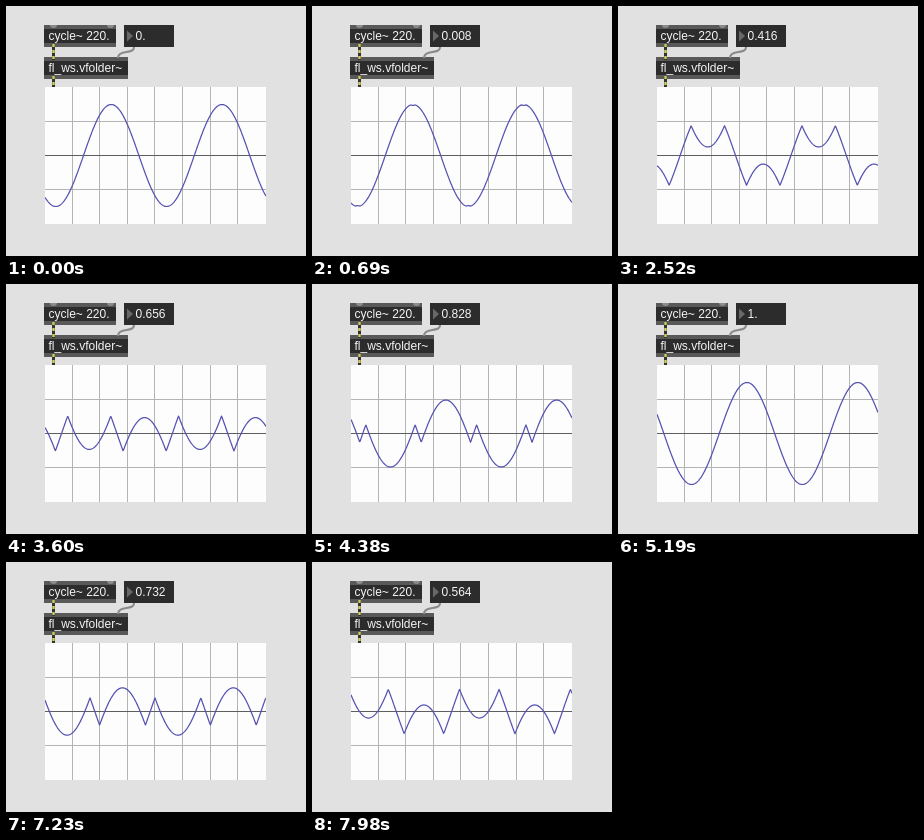
Animation of 300 by 250 pixels, one loop 8 s. Source, as an HTML page:

```html
<!DOCTYPE html>
<html lang="en">
<head>
<meta charset="utf-8">
<title>Wavefolder</title>
<style>
  html, body { margin: 0; width: 100%; height: 100%; overflow: hidden; background: #e1e1e1; }
  svg { display: block; width: 300px; height: 250px; }
  text { font: 12px "Liberation Sans", Arial, sans-serif; fill: #f4f4f4; }
  .body { fill: #2c2c2c; }
  .edge { fill: #595959; }
  .port { fill: #8c8c8c; }
  .grid { stroke: #b4b4b4; fill: none; }
  .axis { stroke: #5e5e62; }
  .cord { stroke: #34342c; stroke-width: 3; }
  .stripe { stroke: #cfd060; stroke-width: 2.4; stroke-dasharray: 3 3; }
</style>
</head>
<body>
<svg viewBox="0 0 300 250">
  <clipPath id="screen"><rect x="39" y="81" width="221" height="137"/></clipPath>

  <rect x="39" y="81" width="221" height="137" fill="#fdfdfd"/>
  <path id="grid" class="grid"/>
  <path class="axis" d="M39 149.5H260"/>
  <path id="wave" clip-path="url(#screen)" fill="none" stroke="#5552b0" stroke-width="1.25" stroke-linejoin="round"/>

  <rect class="body" x="38" y="19" width="72" height="22"/>
  <path class="edge" d="M38 19h72v4h-72zM38 37h72v4h-72z"/>
  <path class="port" d="M44 19h7a3.5 3 0 0 1-7 0zM101 19h7a3.5 3 0 0 1-7 0z"/>
  <text x="42.5" y="34">cycle~ 220.</text>

  <rect class="body" x="118" y="19" width="50" height="22"/>
  <path d="M121 24.5L127 30L121 35.5Z" fill="#686868"/>
  <text id="amount" x="129.5" y="34">0.</text>

  <rect class="body" x="38" y="51" width="84" height="22"/>
  <path class="edge" d="M38 51h84v4h-84zM38 69h84v4h-84z"/>
  <text x="42.5" y="66">fl_ws.vfolder~</text>

  <path d="M128 41C128 49 112 43 112 52" fill="none" stroke="#8a8a8a" stroke-width="2"/>
  <path class="cord" d="M47.5 38V54M47.5 70V81"/>
  <path class="stripe" d="M47.5 38V54M47.5 70V81"/>
</svg>
<script>
const LOOP = 8000, FRAME = 30;
const LEFT = 39, RIGHT = 260, TOP = 81, BOTTOM = 218, MID = 149.5;
const AMPLITUDE = 51, PERIOD = 110.8;
const STEP = 0.004, STEP_MS = 18, RISE_START = 640, FALL_START = 6015;

const wave = document.getElementById('wave');
const amountText = document.getElementById('amount');

let lines = '';
for (let i = 1; i < 8; i++) lines += `M${Math.round(LEFT + i * 27.6) - 0.5} ${TOP}V${BOTTOM}`;
for (const y of [115.5, 183.5]) lines += `M${LEFT} ${y}H${RIGHT}`;
document.getElementById('grid').setAttribute('d', lines);

// Number of control steps elapsed since a ramp began, at most a full ramp.
const steps = (t, start) => Math.min(250, Math.max(0, Math.floor((t - start) / STEP_MS)));

const foldAmount = t => (steps(t, RISE_START) - steps(t, FALL_START)) * STEP;

// Reflects everything beyond the threshold back towards zero.
function fold(s, limit) {
  return Math.abs(s) > limit ? Math.sign(s) * 2 * limit - s : s;
}

function draw(t) {
  const amount = foldAmount(t);
  const crest = 105.2 - 0.0061 * t;
  let d = '';
  for (let x = LEFT; x <= RIGHT; x += 0.5) {
    const s = Math.cos(2 * Math.PI * (x - crest) / PERIOD);
    const y = MID - AMPLITUDE * fold(s, 1 - amount);
    d += `${d ? 'L' : 'M'}${x} ${y.toFixed(2)}`;
  }
  wave.setAttribute('d', d);
  amountText.textContent = amount.toFixed(3).replace(/0+$/, '');
}

function tick() {
  const t = performance.now() % LOOP;
  draw(Math.floor(t / FRAME) * FRAME);
  requestAnimationFrame(tick);
}
tick();
</script>
</body>
</html>
```
